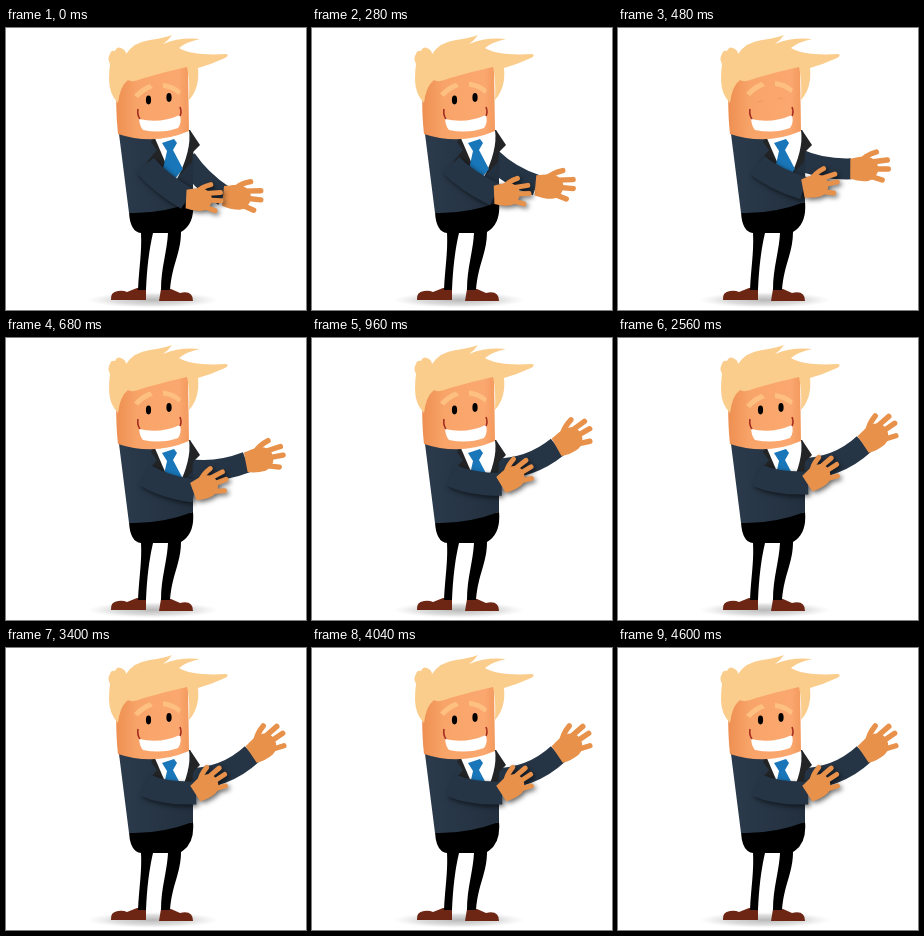
Recreate the animation shown at these times as an HTML page. Size 300 by 282 pixels, loop 5 s.

```html
<!DOCTYPE html>
<html>
<head>
<meta charset="utf-8">
<title>Presenter</title>
<style>
  html, body { margin: 0; width: 100%; height: 100%; overflow: hidden; background: #fff; }
  svg { display: block; width: 100vw; height: 100vh; }
  .sleeve { fill: none; stroke: #263545; }
  #near { filter: drop-shadow(2px 2.5px 2.5px rgba(0, 0, 0, .6)); }
</style>
</head>
<body>
<svg viewBox="0 0 300 282">
  <defs>
    <linearGradient id="skin">
      <stop offset="0" stop-color="#ee8f52"/>
      <stop offset=".3" stop-color="#f8a469"/>
      <stop offset=".85" stop-color="#fba870"/>
      <stop offset="1" stop-color="#f39a5e"/>
    </linearGradient>
    <linearGradient id="suit">
      <stop offset="0" stop-color="#2b3b4c"/>
      <stop offset="1" stop-color="#222f3e"/>
    </linearGradient>
    <radialGradient id="ground">
      <stop offset="0" stop-color="#888" stop-opacity=".6"/>
      <stop offset=".6" stop-color="#aaa" stop-opacity=".4"/>
      <stop offset="1" stop-color="#ccc" stop-opacity="0"/>
    </radialGradient>
    <g id="hand" stroke="#e8914b" stroke-linecap="round" stroke-width="5.4">
      <path fill="#e8914b" stroke="none" d="M-1-10C6-11 13-14 20-11Q27-8 27 0Q26 10 17 12Q8 13-1 10Z"/>
      <path fill="none" d="M10-8Q15-14 25-17M20-7L36-9M22 0L37 0M18 7L31 11"/>
    </g>
  </defs>

  <ellipse cx="147" cy="272" rx="66" ry="8" fill="url(#ground)"/>

  <g id="far">
    <path class="sleeve" stroke-width="21"/>
    <use href="#hand"/>
  </g>

  <!-- legs and shoes -->
  <path d="M105 272Q104 264 112 263Q117 262 121 264L131 260H140V272ZM153 273L155 261H165L174 265Q187 262 187 273Z" fill="#6c2613"/>
  <path d="M123 184L187 174Q189 196 175 204C175 225 166 236 164 262H155C155 240 161 224 162 205H147C143 222 141 240 140 262H132C133 240 136 224 135 205Q124 204 123 184Z"/>

  <!-- jacket, shirt and tie -->
  <path d="M113 106L184 102Q189 118 187 150V174Q155 186 123 185Z" fill="url(#suit)"/>
  <path d="M149 108L184 102L194 117L187 124L186 134L168 153L141 134L151 122L145 114Z" fill="#222426"/>
  <path d="M148 108L183 102Q186 122 171 151L166 150Z" fill="#fff"/>
  <path d="M156 115L168 111L171 115L167 122L177 141L168 152L157 141L161 123Z" fill="#1976b8"/>

  <!-- head -->
  <path d="M111 45L182 38L183 103Q148 118 112 106Q109 80 111 45Z" fill="url(#skin)"/>
  <path d="M104 36Q101 30 104 26Q105 22 109 23Q111 18 115 20Q120 22 120 26Q128 14 144 12Q158 10 166 7Q162 13 157 16Q174 9 194 11Q180 14 173 20Q186 28 220 26Q224 27 219 30Q206 36 192 40Q194 60 183 72Q184 52 181 39Q158 44 138 50Q126 55 122 52Q114 58 112 75Q103 66 103 51Q103 43 104 36Z" fill="#fbcd8d"/>
  <g id="brows" fill="#fdc081">
    <path d="M128 67Q135 59 144 56L147 60Q139 63 132 70Z"/>
    <path d="M157 55Q168 56 175 63L173 67Q166 61 157 60Z"/>
  </g>
  <g id="open">
    <ellipse cx="142.5" cy="72" rx="2.6" ry="4.4"/>
    <ellipse cx="163" cy="69.5" rx="2.6" ry="4.4"/>
  </g>
  <path id="shut" d="M140 74Q143 72 145 74M160 71Q163 69 165 71" fill="none" stroke="#ed985e"/>
  <path d="M133 91Q154 96 174 87Q176 95 172 100Q156 106 137 102Q134 99 133 91Z" fill="#fff"/>
  <path d="M132 81Q131 87 134 91M174 79Q176 84 174 88" fill="none" stroke="#a42d20" stroke-width="1.6"/>

  <g id="near">
    <path class="sleeve" stroke-width="23"/>
    <use href="#hand"/>
  </g>
</svg>
<script>
const $ = id => document.getElementById(id);
const LOOP = 5000, STEP = 40;

// Parabola through a, b and c at p = 0, .5 and 1
const through = (a, b, c, p) =>
  a.map((v, i) => v + (4 * b[i] - 3 * v - c[i]) * p + (2 * v + 2 * c[i] - 4 * b[i]) * p * p);

function poseArm(id, shoulder, elbow, wrist, angle, scale) {
  const [sleeve, hand] = $(id).children;
  sleeve.setAttribute("d", `M${shoulder}Q${elbow} ${wrist}`);
  hand.setAttribute("transform", `translate(${wrist}) rotate(${angle}) scale(${scale})`);
}

function draw(now) {
  const t = Math.floor(now % LOOP / STEP) * STEP;
  const p = (1 - Math.cos(Math.PI * Math.min(1, t / 1140))) / 2;

  poseArm("far", [180, 131],
    through([194, 152], [206, 139], [219, 131], p),
    through([218, 168], [237, 133], [246, 106], p), 6 - 40 * p * p, 1);
  poseArm("near", [139, 137],
    through([153, 154], [157, 150], [158, 146], p),
    through([181, 171], [187, 157], [190, 145], p), 3 - 36 * p, .92);

  const lift = Math.sin(Math.PI * Math.min(1, t % 3000 / 1600));
  $("brows").setAttribute("transform", `translate(0 ${-2.5 * lift})`);

  const blink = t % 2000 >= 440 && t % 2000 < 560;
  $("open").style.display = blink ? "none" : "";
  $("shut").style.display = blink ? "" : "none";
}

const start = performance.now();
function tick() {
  draw(performance.now() - start);
  requestAnimationFrame(tick);
}
tick();
</script>
</body>
</html>
```
